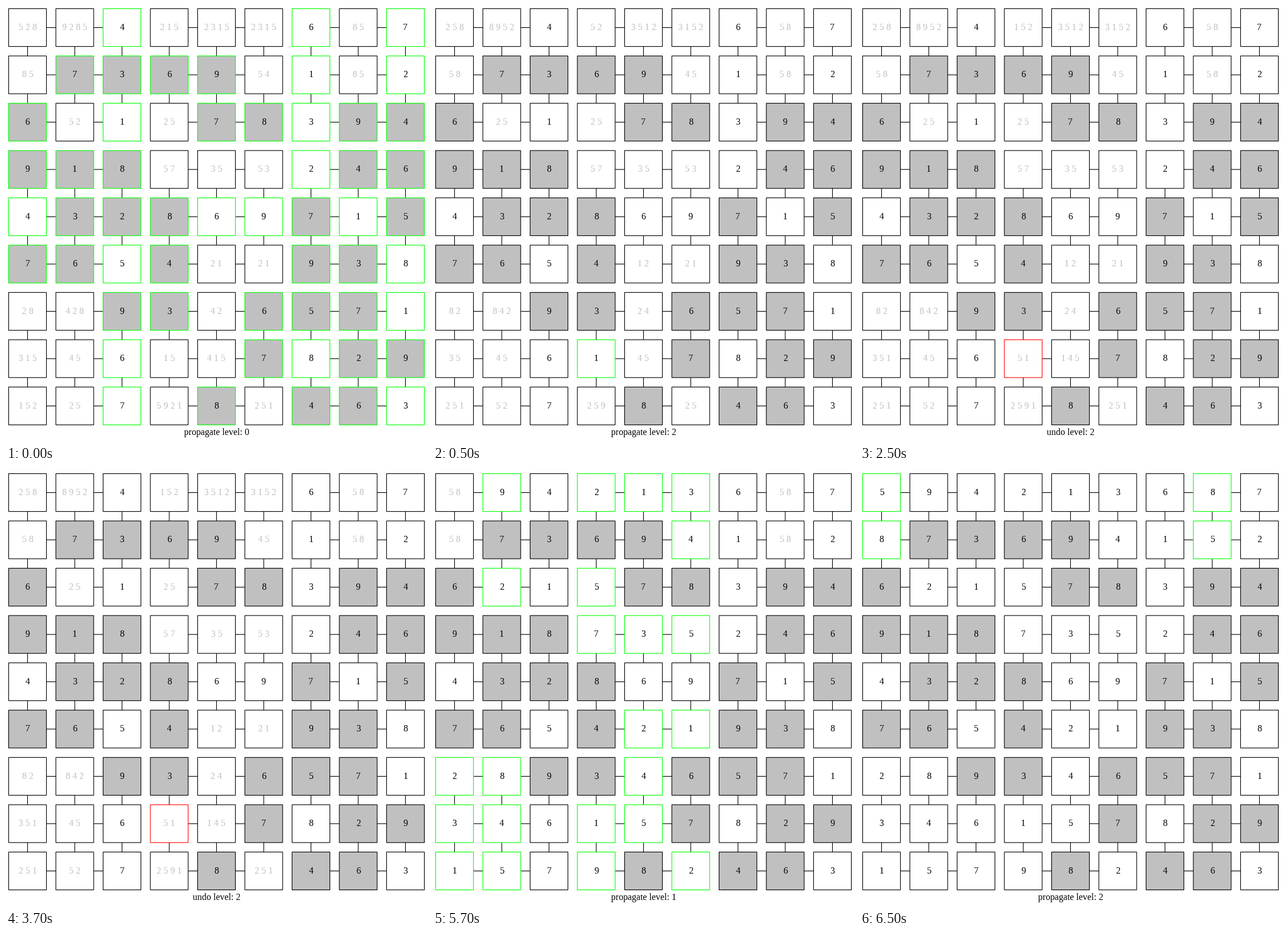
Write a matplotlib script that moves like this. It is 735 by 762 pixels and loops after 8000 ms.

```python
"""Sudoku solver: candidates, propagation and undo shown on a node grid."""
from itertools import product

import matplotlib.pyplot as plt
from matplotlib.animation import FuncAnimation
from matplotlib.patches import Rectangle

W, H, DPI = 735, 762, 64
UNIT = W / 641.6                 # pixels per layout point
PITCH, SIDE, PAD = 72 * UNIT, 57.6 * UNIT, 4 * UNIT
STROKE = UNIT * 72 / DPI
FONT = dict(family="Liberation Serif", size=14 * UNIT * 72 / DPI,
            ha="center", va="baseline")
BLACK, GRAY, GREEN, RED = "#000000", "#c0c0c0", "#00ff00", "#ff0000"

SOLUTION = """594213687 873694152 621578394
              918735246 432869715 765421938
              289346571 346157829 157982463""".split()
GIVEN = """......... .####.... #...##.##
           ###....## .###..#.# ##.#..##.
           ..##.###. .....#.## ....#.##.""".split()
CELLS = list(product(range(9), repeat=2))    # (row, column)


def parse(rows):
    """Map each open cell to its candidates, from 'row: column=digits ...'."""
    open_cells = {}
    for line in rows.strip().splitlines():
        row, items = line.split(":")
        for item in items.split():
            col, digits = item.split("=")
            open_cells[int(row), int(col)] = " ".join(digits)
    return open_cells


initial = parse("""
0: 0=528 1=9285 3=215 4=2315 5=2315 7=85
1: 0=85 5=54 7=85
2: 1=52 3=25
3: 3=57 4=35 5=53
5: 4=21 5=21
6: 0=28 1=428 4=42
7: 0=315 1=45 3=15 4=415
8: 0=152 1=25 3=5921 5=251""")
guess = parse("""
0: 0=258 1=8952 3=52 4=3512 5=3152 7=58
1: 0=58 5=45 7=58
2: 1=25 3=25
3: 3=57 4=35 5=53
5: 4=12 5=21
6: 0=82 1=842 4=24
7: 0=35 1=45 4=45
8: 0=251 1=52 3=259 5=25""")
undone = {**guess, **parse("""
0: 3=152
7: 0=351 3=51 4=145
8: 3=2591 5=251""")}
almost = parse("0: 0=58 7=58\n1: 0=58 7=58")

STATES = [dict.fromkeys(CELLS), initial, guess, undone, almost, {}]
CAPTIONS = ["propagate level: 0", "propagate level: 2", "undo level: 2",
            "propagate level: 1", "propagate level: 2"]
STARTS = [0, 1, 5, 9, 13]        # in half seconds


def center(i):
    return PAD + SIDE / 2 + i * PITCH


fig = plt.figure(figsize=(W / DPI, H / DPI), dpi=DPI, facecolor="white")
ax = fig.add_axes([0, 0, 1, 1])
ax.set(xlim=(0, W), ylim=(H, 0))
ax.axis("off")

# Links join neighbours inside each 3x3 block.
for i, j in CELLS:
    if i % 3 < 2:
        ends = [center(i) + SIDE / 2, center(i + 1) - SIDE / 2]
        across = [center(j)] * 2
        for xs, ys in ((ends, across), (across, ends)):
            ax.plot(xs, ys, color=BLACK, lw=STROKE, snap=False,
                    solid_capstyle="butt")

boxes, labels = {}, {}
for r, c in CELLS:
    x, y = center(c), center(r)
    boxes[r, c] = ax.add_patch(Rectangle(
        (x - SIDE / 2, y - SIDE / 2), SIDE, SIDE, lw=STROKE, snap=False,
        joinstyle="miter", zorder=3,
        facecolor=GRAY if GIVEN[r][c] == "#" else "white"))
    labels[r, c] = ax.text(x, round(y + 3.7 * UNIT), "", zorder=4, **FONT)
caption = ax.text(W / 2, 748, "", color=BLACK, **FONT)


def update(frame):
    step = sum(start <= frame for start in STARTS) - 1
    before, now = STATES[step], STATES[step + 1]
    for cell in CELLS:
        r, c = cell
        is_open, was_open = cell in now, cell in before
        edge = BLACK if is_open == was_open else RED if is_open else GREEN
        if step == 0 and not is_open:
            edge = GREEN
        boxes[cell].set_edgecolor(edge)
        labels[cell].set_text(now[cell] if is_open else SOLUTION[r][c])
        labels[cell].set_color(GRAY if is_open else BLACK)
    caption.set_text(CAPTIONS[step])
    return [*boxes.values(), *labels.values(), caption]


anim = FuncAnimation(fig, update, frames=16, interval=500, repeat=True,
                     repeat_delay=0, blit=False)
plt.show()
```
